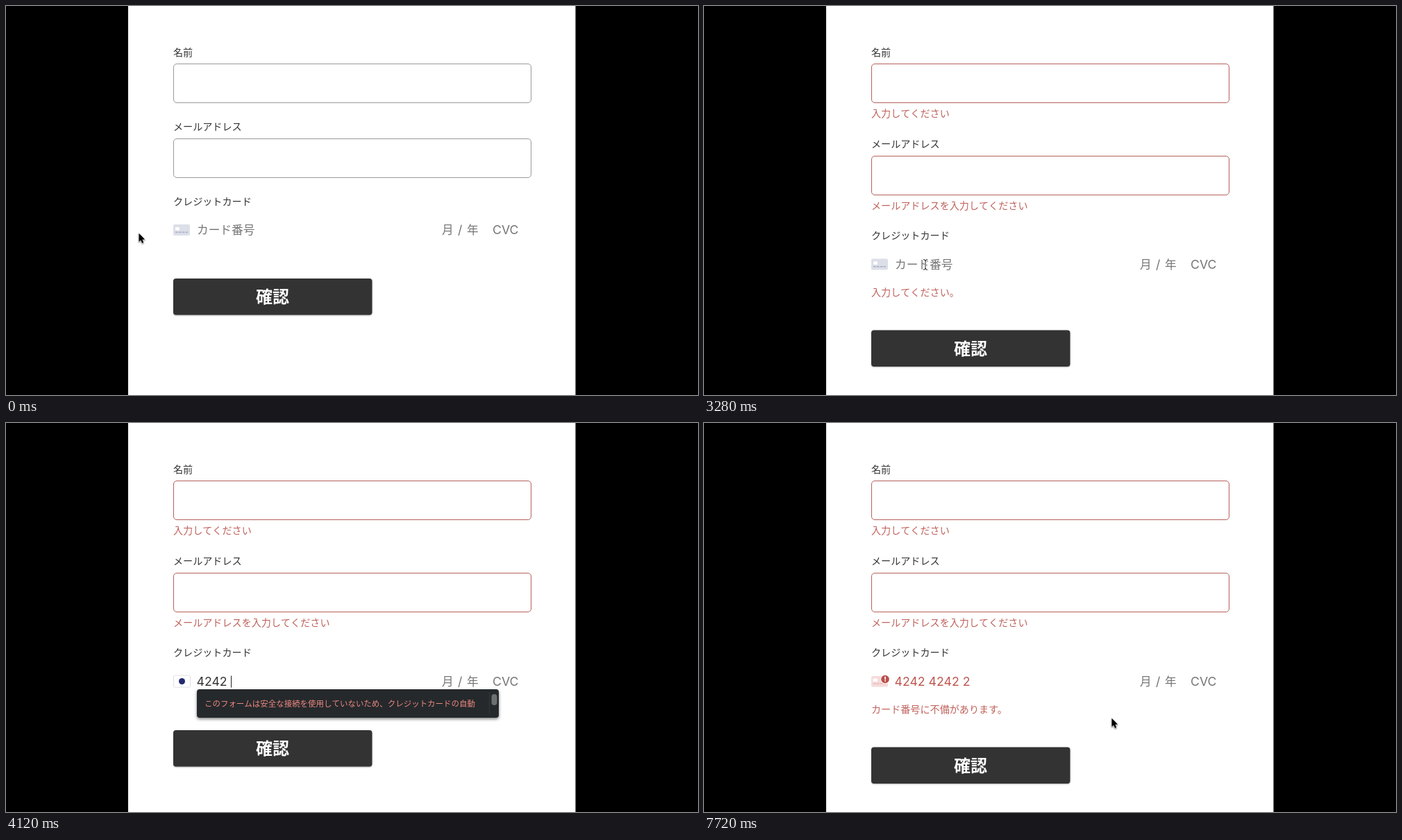
An HTML page with a canvas for the animation above (8200 ms loop, 997 by 561 pixels).

```html
<!DOCTYPE html>
<html lang="ja">
<head>
<meta charset="utf-8">
<title>フォーム</title>
<style>
html, body { margin: 0; width: 100%; height: 100%; overflow: hidden; background: #000; }
canvas { display: block; }
</style>
</head>
<body>
<canvas id="stage" width="997" height="561"></canvas>
<script>
const ctx = document.getElementById('stage').getContext('2d');
const LOOP = 8200, STEP = 40;
const JP = '"Noto Sans CJK JP", "Noto Sans CJK", sans-serif';
const LATIN = 'Inter, "Liberation Sans", sans-serif';
const INK = '#333', GREY = '#757575', RED = '#c0625c', EDGE_RED = '#b5615c';

// Times of the main events
const CLICK = 1360, FOCUS = 2800, TYPE = 3760, POPUP_END = 4240, BLUR = 5880;
const CARD = '4242 4242 2';
const KEYS = [[3760, 1], [3880, 2], [3960, 3], [4080, 5], [4240, 6], [4400, 7], [4560, 8], [4680, 10], [5080, 11]];

const clamp = v => Math.max(0, Math.min(1, v));
const ramp = (t, a, b) => clamp((t - a) / (b - a));
const easeOut = p => 1 - (1 - p) ** 2;
const easeBoth = p => p * p * (3 - 2 * p);

function box(x, y, w, h, r) {
  ctx.beginPath();
  ctx.roundRect(x, y, w, h, r);
}

function fillBox(x, y, w, h, r, color) {
  box(x, y, w, h, r);
  ctx.fillStyle = color;
  ctx.fill();
}

function text(str, x, y, size, color, family = JP, weight = 400) {
  ctx.font = `${weight} ${size}px ${family}`;
  ctx.fillStyle = color;
  ctx.fillText(str, x, y);
}

function faded(alpha, draw) {
  if (alpha <= 0) return;
  ctx.save();
  ctx.globalAlpha = alpha;
  draw();
  ctx.restore();
}

function shaded(blur, dy, color, draw) {
  ctx.save();
  ctx.shadowBlur = blur;
  ctx.shadowOffsetY = dy;
  ctx.shadowColor = color;
  draw();
  ctx.restore();
}

function field(y, color, width = 1) {
  const d = width / 2;
  box(241 + d, y + d, 516 - width, 57 - width, 4.5);
  ctx.fillStyle = '#fff';
  ctx.fill();
  ctx.lineWidth = width;
  ctx.strokeStyle = color;
  ctx.stroke();
}

function caret(x, y, h) {
  ctx.fillStyle = '#222';
  ctx.fillRect(x, y, 1, h);
}

function button(y) {
  shaded(2, 1, 'rgba(0,0,0,.3)', () => fillBox(241, y, 286.5, 52.5, 4, '#333'));
  ctx.textAlign = 'center';
  text('確認', 384, y + 35, 24, '#fff', JP, 700);
  ctx.textAlign = 'left';
}

// Card icons; cy is the vertical centre of the row
function plainIcon(cy) {
  fillBox(241, cy - 8, 24, 16, 2, '#dcdfe8');
  fillBox(244, cy - 4, 6, 4.5, 1, '#fff');
  ctx.fillStyle = '#a9b1c3';
  for (let i = 0; i < 4; i++) ctx.fillRect(244 + i * 4.8, cy + 2.5, 3.6, 1.6);
}

function brandIcon(cy) {
  box(241.5, cy - 8.5, 24, 17, 2);
  ctx.fillStyle = '#fff';
  ctx.fill();
  ctx.lineWidth = 1;
  ctx.strokeStyle = '#dfe0e4';
  ctx.stroke();
  ctx.beginPath();
  ctx.arc(253.5, cy, 4.5, 0, 7);
  ctx.fillStyle = '#232a70';
  ctx.fill();
}

function errorIcon(cy) {
  fillBox(241, cy - 7.5, 24, 15.5, 2, '#f5dcdb');
  fillBox(243.5, cy - 4, 6.5, 4.5, 1, '#fff');
  ctx.fillStyle = '#e8b9b7';
  for (let i = 0; i < 4; i++) ctx.fillRect(244 + i * 4.8, cy + 2.5, 3.6, 1.6);
  ctx.beginPath();
  ctx.arc(261, cy - 3, 6.6, 0, 7);
  ctx.fillStyle = '#fff';
  ctx.fill();
  ctx.beginPath();
  ctx.arc(261, cy - 3, 5.8, 0, 7);
  ctx.fillStyle = '#b9504b';
  ctx.fill();
  ctx.fillStyle = '#fff';
  ctx.fillRect(260.2, cy - 6.8, 1.7, 4.6);
  ctx.fillRect(260.2, cy - 1.4, 1.7, 1.7);
}

function popup() {
  shaded(4, 2, 'rgba(0,0,0,.5)', () => fillBox(275, 384, 435, 41, 4, '#25292c'));
  text('このフォームは安全な接続を使用していないため、クレジットカードの自動', 286, 409.4, 11.47, '#ee8880');
  ctx.fillStyle = '#33373a';
  ctx.fillRect(696, 389, 1, 31);
  fillBox(699.5, 391, 8, 16, 4, '#6d6f70');
}

function shape(points, fill, line, width) {
  ctx.beginPath();
  points.forEach(([x, y]) => ctx.lineTo(x, y));
  ctx.closePath();
  ctx.lineJoin = 'round';
  ctx.lineWidth = width;
  ctx.strokeStyle = line;
  ctx.stroke();
  ctx.fillStyle = fill;
  ctx.fill();
}

const ARROW = [[0.5, 0.8], [0.5, 13], [3.2, 10.5], [5.2, 15], [7.2, 14.1], [5.3, 9.8], [9, 9.6]];
const HAND = [[-3, 0.5], [-1.5, 0], [-0.3, 1], [1, 5], [3, 4.6], [4, 5.4], [6, 5.2], [7.5, 6.5],
  [8.4, 9], [7.5, 12], [7, 14], [0.5, 14], [-1.5, 11], [-4.3, 8], [-3.8, 6.8], [-2, 7.3], [-1.2, 8]];

const cursors = {
  arrow() {
    shaded(2, 1, 'rgba(0,0,0,.35)', () => shape(ARROW, '#000', '#fff', 1.6));
  },
  hand() {
    shape(HAND, '#fff', '#000', 1.6);
    ctx.fillStyle = '#222';
    for (const x of [1, 3.2, 5.4]) ctx.fillRect(x, 8.5, 0.9, 3.5);
  },
  beam() {
    for (const [color, width] of [['#fff', 2.6], ['#222', 1]]) {
      ctx.beginPath();
      ctx.moveTo(-3, -7.5);
      ctx.quadraticCurveTo(0, -7.5, 0, -5);
      ctx.lineTo(0, 5);
      ctx.quadraticCurveTo(0, 7.5, -3, 7.5);
      ctx.moveTo(3, -7.5);
      ctx.quadraticCurveTo(0, -7.5, 0, -5);
      ctx.moveTo(0, 5);
      ctx.quadraticCurveTo(0, 7.5, 3, 7.5);
      ctx.lineWidth = width;
      ctx.strokeStyle = color;
      ctx.stroke();
    }
  }
};

function between(a, b, p) {
  return [a[0] + (b[0] - a[0]) * p, a[1] + (b[1] - a[1]) * p];
}

function pointer(t) {
  const start = [191, 327], onButton = [279, 409], onCard = [319, 373], out = [594, 409], rest = [587, 425];
  if (t < CLICK) {
    const p = between(start, onButton, easeBoth(ramp(t, 600, 920)));
    return [p[1] >= 393 && p[0] >= 241 ? 'hand' : 'arrow', ...p];
  }
  if (t < TYPE) {
    const mid = [312, 388];
    const p = t < 2080
      ? between(onButton, mid, easeBoth(ramp(t, 1800, 2080)))
      : between(mid, onCard, easeOut(ramp(t, 2080, 2440)));
    return [p[1] > 402 || p[1] < 383 ? 'beam' : 'arrow', ...p];
  }
  if (t < 5080) return null;
  const p = t < 5320
    ? between([355, 373], out, easeOut(ramp(t, 5080, 5320)))
    : between(out, rest, easeOut(ramp(t, 5320, 5600)));
  return [p[1] < 383 ? 'beam' : 'arrow', ...p];
}

function cardRow(t, cy) {
  const typed = t >= TYPE, invalid = t >= BLUR;
  faded(1 - ramp(t, TYPE - 40, TYPE + 80), () => plainIcon(cy));
  faded(ramp(t, 3860, 4080) * (1 - ramp(t, BLUR, BLUR + 160)), () => brandIcon(cy));
  faded(ramp(t, BLUR + 80, 6320), () => errorIcon(cy));

  const base = cy + 6.4;
  let caretX = 275;
  if (typed) {
    let count = 0;
    for (const [at, n] of KEYS) if (t >= at) count = n;
    const value = CARD.slice(0, count);
    text(value, 274.5, base, 17.7, invalid ? '#bd564f' : INK, LATIN);
    caretX = Math.round(274.5 + ctx.measureText(value).width);
  } else {
    text('カード番号', 275, base, 16.7, GREY);
  }
  text('月', 628, base, 16.7, GREY);
  text('/', 651, base, 17.7, GREY, LATIN);
  text('年', 664, base, 16.7, GREY);
  text('CVC', 701, base, 17.7, GREY, LATIN);

  const caretOn = t >= FOCUS && t < 5600 && !(t >= 3280 && t < TYPE);
  if (caretOn) caret(caretX, cy - 8, 17);
}

function draw(t) {
  ctx.fillStyle = '#000';
  ctx.fillRect(0, 0, 997, 561);
  ctx.fillStyle = '#fff';
  ctx.fillRect(176, 0, 644.5, 561);

  const checked = t >= CLICK;
  const nameFocus = checked && t < FOCUS;
  const cardError = checked && (t < TYPE || t >= BLUR);
  const label = (str, y, color = INK) => text(str, 241, y, 14.1, color);

  label('名前', 72.4);
  if (nameFocus) field(83, '#0c66b5', 2);
  else field(83, checked ? EDGE_RED : '#999');
  if (nameFocus && (t < 1840 || t >= 2360)) caret(261, 101, 21);

  if (checked) {
    label('入力してください', 160.2, RED);
    label('メールアドレス', 203.9);
    field(216, EDGE_RED);
    label('メールアドレスを入力してください', 292.7, RED);
    label('クレジットカード', 336.4);
  } else {
    label('メールアドレス', 179.3);
    field(191, '#999');
    label('クレジットカード', 286.9);
  }

  cardRow(t, checked ? 372.5 : 323);
  if (cardError) label(t < TYPE ? '入力してください。' : 'カード番号に不備があります。', 417.7, RED);
  button(!checked ? 393 : cardError ? 467.5 : 443);
  if (t >= TYPE + 40 && t < POPUP_END) popup();

  const mouse = pointer(t);
  if (mouse) {
    const [kind, x, y] = mouse;
    ctx.save();
    ctx.translate(Math.round(x), Math.round(y));
    cursors[kind]();
    ctx.restore();
  }
}

const begin = performance.now();
function tick() {
  const t = (performance.now() - begin) % LOOP;
  draw(Math.floor(t / STEP) * STEP);
  requestAnimationFrame(tick);
}
tick();
</script>
</body>
</html>
```
